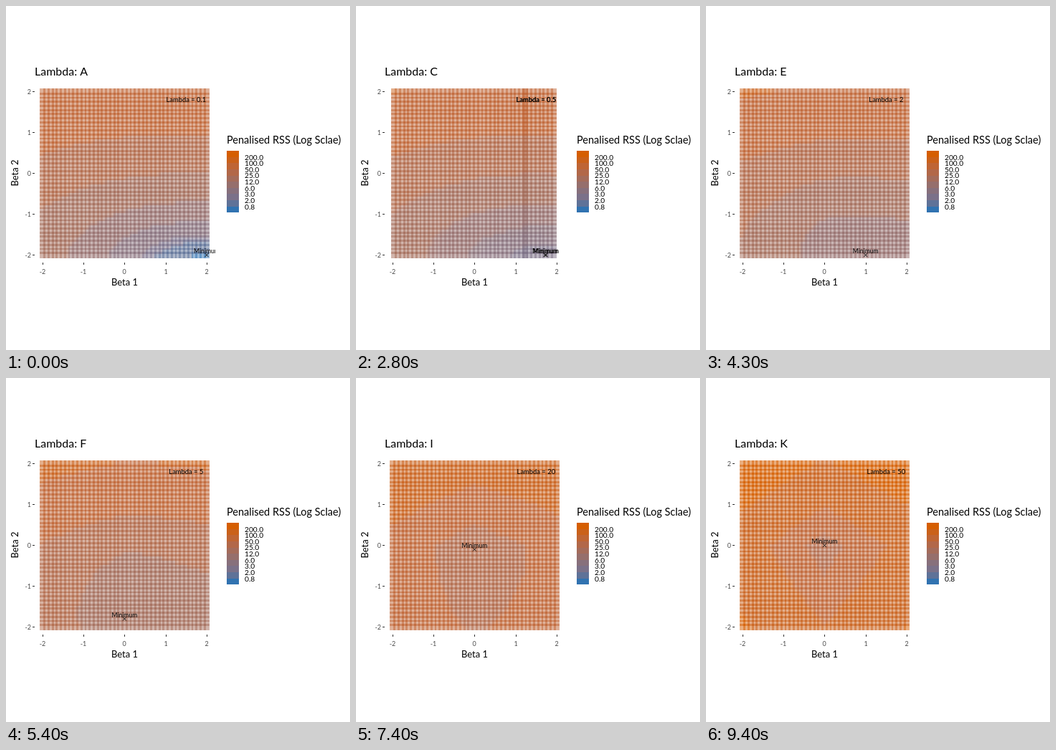
Recreate the animation shown at these times as an HTML page with a canvas. Size 480 by 480 pixels, loop 10000 ms.

```html
<!DOCTYPE html>
<html lang="en">
<head>
<meta charset="utf-8">
<title>Penalised RSS</title>
<style>
  html, body { margin: 0; width: 100%; height: 100%; overflow: hidden; background: #fff; }
  canvas { display: block; }
</style>
</head>
<body>
<canvas id="stage" width="480" height="480"></canvas>
<script>
const ctx = document.getElementById('stage').getContext('2d');
const LOOP = 10000, STEP = 100, STEPS = 5;
const FONT = 'Lato, sans-serif';

// begin: when the move into the state starts; minima: [beta 1, beta 2]
const states = [
  { name: 'A', lambda: 0.1, begin: -1000, minima: [[2, -2]] },
  { name: 'B', lambda: 0.2, begin: 600, minima: [[1.9, -2]] },
  { name: 'C', lambda: 0.5, begin: 1700, minima: [[1.8, -2]] },
  { name: 'D', lambda: 1, begin: 2800, minima: [[1.5, -2], [1.4, -2]] },
  { name: 'E', lambda: 2, begin: 3900, minima: [[1, -2]] },
  { name: 'F', lambda: 5, begin: 5000, minima: [[0, -1.8]] },
  { name: 'H', lambda: 10, begin: 6000, minima: [[0, -1.3]] },
  { name: 'I', lambda: 20, begin: 7000, minima: [[0, -0.1]] },
  { name: 'J', lambda: 35, begin: 8000, minima: [[0, 0]] },
  { name: 'K', lambda: 50, begin: 9000, minima: [[0, 0]] }
];

const breaks = [0.8, 2, 3, 6, 12, 25, 50, 100, 200];
const ramp = [[49, 115, 177], [121, 113, 139], [156, 110, 102], [187, 102, 61], [213, 94, 0]];

const px = b => 165.4 + 57.3 * b;
const py = b => 233.5 - 57 * b;
const mix = (a, b, t) => a + (b - a) * t;
const mixAll = (a, b, t) => a.map((v, i) => mix(v, b[i], t));
const rgb = c => `rgb(${c.map(Math.round).join(',')})`;

function rampColor(t) {
  const pos = t * (ramp.length - 1);
  const i = Math.min(Math.floor(pos), ramp.length - 2);
  return mixAll(ramp[i], ramp[i + 1], pos - i);
}

const edges = [0.25, ...breaks, 400].map(Math.log2);
const mids = edges.slice(1).map((e, i) => (e + edges[i]) / 2);
const binColors = mids.map(m => rampColor((m - mids[0]) / (mids[9] - mids[0])));

function fillFor(b1, b2, lambda) {
  const rss = (b1 - 2) ** 2 + 4.7 * (b2 + 2.22 + 0.02 * b1) ** 2;
  const value = rss + lambda * (Math.abs(b1) + Math.abs(b2));
  return binColors[breaks.filter(b => value >= b).length];
}

function label(text, x, y, size, align = 'center', color = '#000') {
  ctx.font = `${size}px ${FONT}`;
  ctx.textAlign = align;
  ctx.textBaseline = 'middle';
  ctx.fillStyle = color;
  ctx.fillText(text, x, y);
}

// Wide translucent tiles overlap, which makes the woven pattern.
function drawTiles(from, to, t) {
  const moving = t < 1;
  ctx.globalAlpha = 0.5;
  for (let i = -20; i <= 20; i++) {
    const b1 = i / 10;
    const shift = !moving ? 0 : i <= 12 ? 2 : -3.8;
    const left = Math.round(px(b1 - 0.075) + shift);
    const right = Math.round(px(b1 + 0.075) + shift);
    for (let j = -20; j <= 20; j++) {
      const b2 = j / 10;
      const top = Math.round(py(b2 + 0.075));
      const bottom = Math.round(py(b2 - 0.075));
      ctx.fillStyle = rgb(mixAll(fillFor(b1, b2, from.lambda), fillFor(b1, b2, to.lambda), t));
      ctx.fillRect(left, top, right - left, bottom - top);
    }
  }
  ctx.globalAlpha = 1;
}

function drawMinimum(x, y, lambda) {
  ctx.strokeStyle = '#000';
  ctx.lineWidth = 0.9;
  ctx.beginPath();
  ctx.moveTo(x - 2.5, y - 2.5);
  ctx.lineTo(x + 2.5, y + 2.5);
  ctx.moveTo(x + 2.5, y - 2.5);
  ctx.lineTo(x - 2.5, y + 2.5);
  ctx.stroke();
  label('Minimum', x, y - 5, 8.6);
  label(`Lambda = ${lambda}`, px(1.5), 131.5, 9.4);
}

function drawMinima(from, to, t, lambda) {
  const count = t < 1 ? Math.max(from.minima.length, to.minima.length) : to.minima.length;
  const pick = (list, i) => list[Math.min(i, list.length - 1)];
  for (let i = 0; i < count; i++) {
    const [b1, b2] = mixAll(pick(from.minima, i), pick(to.minima, i), t);
    drawMinimum(px(b1), py(b2), lambda);
  }
}

function drawAxes() {
  for (let v = -2; v <= 2; v++) {
    const x = Math.round(px(v)), y = Math.round(py(v));
    ctx.fillStyle = '#333';
    ctx.fillRect(x, 358, 1, 3);
    ctx.fillRect(37, y - 1, 3, 1);
    label(v, x, 371, 9, 'center', '#4d4d4d');
    label(v, 35, y, 9, 'right', '#4d4d4d');
  }
  label('Beta 1', 165.5, 386.5, 13);
  ctx.save();
  ctx.translate(13, 233);
  ctx.rotate(-Math.PI / 2);
  label('Beta 2', 0, 0, 13);
  ctx.restore();
}

function drawLegend() {
  const top = 202, size = 8.64;
  label('Penalised RSS (Log Sclae)', 308, 188, 14.5, 'left');
  binColors.forEach((color, i) => {
    const y = Math.round(top + (9 - i) * size);
    ctx.fillStyle = rgb(color);
    ctx.fillRect(308, y, 17, Math.round(top + (10 - i) * size) - y);
  });
  breaks.forEach((b, i) => label(b.toFixed(1), 333, top + (9 - i) * size + 0.8, 10.2, 'left'));
}

function draw(time) {
  const index = states.findLastIndex(s => s.begin <= time);
  const to = states[index], from = states[Math.max(index - 1, 0)];
  const t = Math.min(1, (Math.floor((time - to.begin) / STEP) + 1) / STEPS);
  const nearest = t < 0.5 ? from : to;

  ctx.fillStyle = '#fff';
  ctx.fillRect(0, 0, 480, 480);
  ctx.save();
  ctx.beginPath();
  ctx.rect(40, 108, 252, 251);
  ctx.clip();
  drawTiles(from, to, t);
  drawMinima(from, to, t, nearest.lambda);
  ctx.restore();
  label(`Lambda: ${nearest.name}`, 40, 92.5, 16, 'left');
  drawAxes();
  drawLegend();
}

let shown = -1;
function tick() {
  const time = Math.floor((performance.now() % LOOP) / STEP) * STEP;
  if (time !== shown) {
    shown = time;
    draw(time);
  }
  requestAnimationFrame(tick);
}
tick();
</script>
</body>
</html>
```
